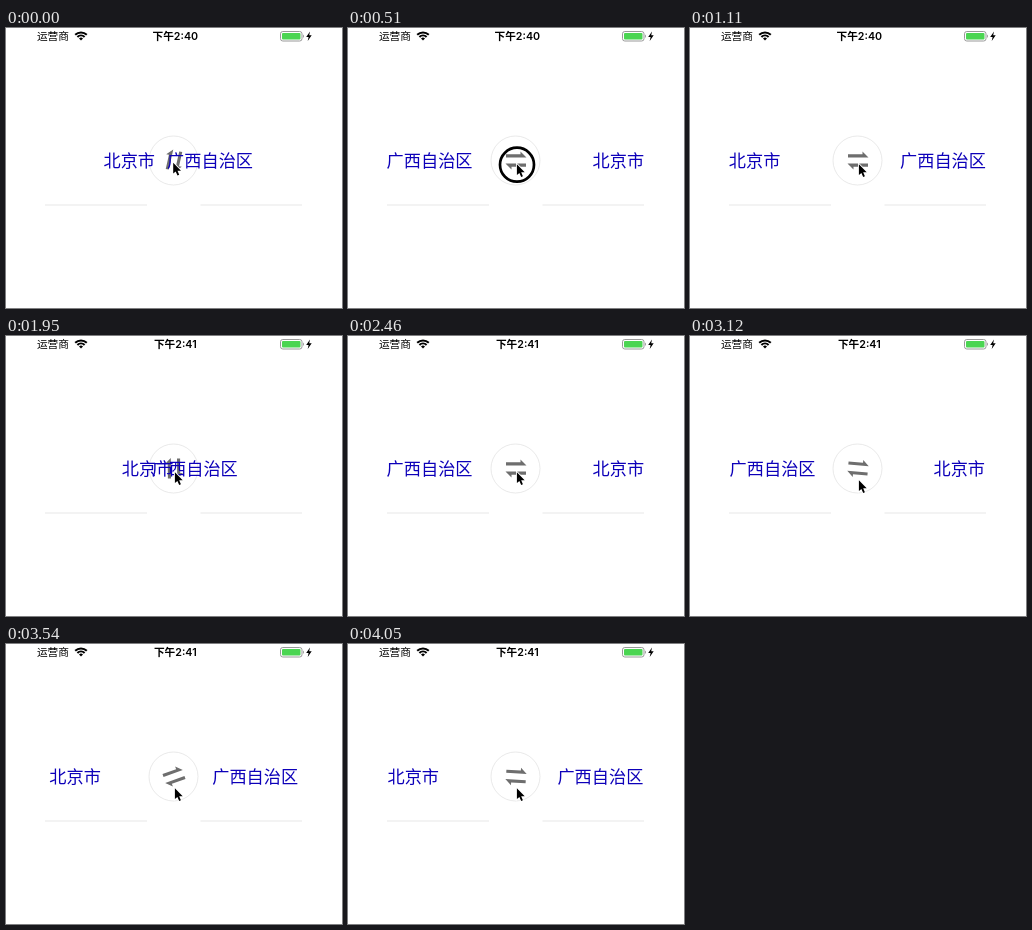
Write an HTML page that moves like this. It is 336 by 280 pixels and loops after 4.11 s.

```html
<!DOCTYPE html>
<html lang="zh-CN">
<head>
<meta charset="utf-8">
<title>城市互换</title>
<style>
  html, body { margin: 0; width: 100%; height: 100%; overflow: hidden; background: #fff; }
  svg { display: block; width: 100vw; height: 100vh; }
  text { font-family: "Noto Sans CJK SC", "Noto Sans CJK", sans-serif; }
  .city { font-size: 17.2px; fill: #0d00b9; }
  .status { font-size: 10.7px; }
  #clock { font-family: Inter, "Noto Sans CJK SC", "Noto Sans CJK", sans-serif; font-weight: 600; text-anchor: middle; }
</style>
</head>
<body>
<svg viewBox="0 0 336 280">
  <text class="status" x="30.9" y="12.1">运营商</text>
  <g transform="translate(75 12.5)" fill="none" stroke="#000" stroke-width="2">
    <path d="M-5.8-5.7A8.2 8.2 0 0 1 5.8-5.7M-3.6-3.5A5.1 5.1 0 0 1 3.6-3.5"/>
    <path d="M0 0L-2-2A2.8 2.8 0 0 1 2-2Z" fill="#000" stroke="none"/>
  </g>
  <text class="status" id="clock" x="169.3" y="12.1"></text>
  <rect x="274.5" y="3.5" width="21.5" height="9.5" rx="2.3" fill="#fff" stroke="#999"/>
  <rect x="276" y="5" width="18.5" height="6.5" rx="1" fill="#4bd552"/>
  <path d="M297 6.5Q299 8.2 297 10Z" fill="#999"/>
  <path d="M304 3.5L300.2 9H302.6L301.7 13L305.7 7.3H303.2Z"/>

  <path d="M39 177H141M194.5 177H296" stroke="#efefef" stroke-width="1.5"/>
  <circle cx="167.5" cy="132.5" r="24.5" fill="#fff" stroke="#e0e0e0" stroke-width=".7"/>
  <g id="icon" fill="#6e6e6e">
    <path id="harpoon" d="M-10-3.1V-6.2H4.5V-9L10.5-3.1Z"/>
    <use href="#harpoon" transform="rotate(180)"/>
  </g>
  <text class="city" id="beijing" y="139">北京市</text>
  <text class="city" id="guangxi" y="139">广西自治区</text>
  <g id="pointer">
    <circle id="ring" cx=".5" cy="1.2" r="17" fill="none" stroke="#000" stroke-width="2.7"/>
    <path d="M.4 .8V11.6L2.9 9.4 4.7 13.6 6.4 12.8 4.7 8.8H8.2Z" stroke="#fff" stroke-width="1.8" paint-order="stroke"/>
  </g>
</svg>
<script>
const LOOP = 4110, TICK = 30, DURATION = 500;
const swapStarts = [-185, 605, 1737, 3093, 4029];
const presses = [[510, 630], [1620, 1740], [2850, 3120], [3900, 4020]];
// time, x, y of the pointer tip
const pointerStops = [
  [0, 166.8, 134], [390, 167.5, 134.8], [420, 168.5, 135.5],
  [2490, 200, 132], [2520, 249, 130.5], [2580, 243, 134],
  [2610, 205, 139], [2640, 175, 143], [2670, 168.5, 143.5]
];
const $ = id => document.getElementById(id);
const mix = (a, b, p) => a + (b - a) * p;
const lastBefore = (list, test) => list.filter(test).pop();

// cubic-bezier(.42, 0, .58, 1)
function easeInOut(x) {
  if (x <= 0 || x >= 1) return x <= 0 ? 0 : 1;
  let low = 0, high = 1, s;
  for (let i = 0; i < 25; i++) {
    s = (low + high) / 2;
    const q = 1 - s;
    if (1.26 * s * q * q + 1.74 * s * s * q + s ** 3 < x) low = s; else high = s;
  }
  return s * s * (3 - 2 * s);
}

function render(t) {
  const start = lastBefore(swapStarts, s => s <= t);
  const index = swapStarts.indexOf(start);
  const p = easeInOut((t - start) / DURATION);
  const swapped = index % 2 ? 1 - p : p;
  $("beijing").setAttribute("x", mix(38.8, 244.6, swapped));
  $("guangxi").setAttribute("x", mix(210, 38.6, swapped));
  // every tap spins the icon half a turn further than the one before
  $("icon").setAttribute("transform", `translate(168 132.5) rotate(${180 * (index + 2) * p})`);

  const [, x, y] = lastBefore(pointerStops, stop => stop[0] <= t);
  $("pointer").setAttribute("transform", `translate(${x} ${y})`);
  const pressed = presses.some(([down, up]) => t >= down && t < up);
  $("ring").setAttribute("visibility", pressed ? "visible" : "hidden");
  $("clock").textContent = t < 1800 ? "下午2:40" : "下午2:41";
}

const origin = performance.now();
function frame() {
  const t = (performance.now() - origin) % LOOP;
  render(Math.floor(t / TICK) * TICK);
  requestAnimationFrame(frame);
}
frame();
</script>
</body>
</html>
```
